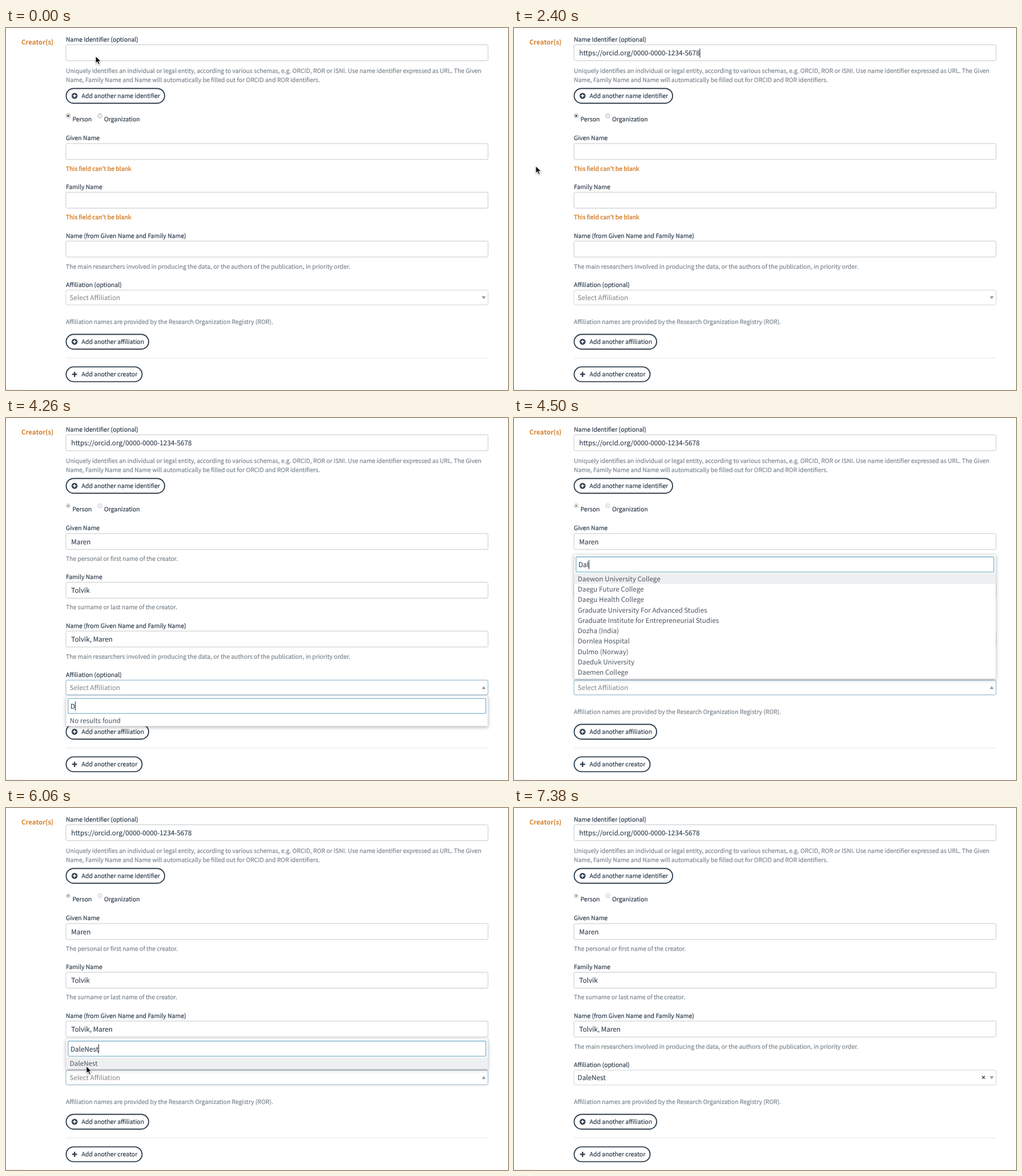
An HTML page that plays this animation: 880x636 px, repeating every 7440 ms.

```html
<!DOCTYPE html>
<html lang="en">
<head>
<meta charset="utf-8">
<title>Creator form</title>
<style>
  html, body { margin: 0; width: 100%; height: 100%; overflow: hidden; background: #fff; }
  svg { display: block; width: 880px; height: 636px; }
  text {
    font-family: "Noto Sans CJK JP", "Noto Sans CJK SC", "Noto Sans CJK KR", "Noto Sans CJK", Lato, sans-serif;
    font-size: 10.5px; fill: #2f3e4e; stroke: #2f3e4e; stroke-width: .2px;
    text-rendering: geometricPrecision;
  }
  .help { font-size: 10.4px; fill: #7b858d; stroke: #7b858d; }
  .error { font-size: 10.4px; fill: #d5812f; stroke: #d5812f; stroke-width: .4px; }
  .title { font-size: 11.45px; font-weight: 700; fill: #d5812f; stroke: none; }
  .value { font-size: 11.72px; stroke-width: .12px; }
  .item { font-size: 11.67px; fill: #4b5661; stroke: none; }
  .muted { font-size: 11.67px; fill: #808080; stroke: none; }
  .box { fill: #fff; stroke: #c6c8ca; }
  .pill { fill: #fff; stroke: #33424f; stroke-width: 1.9px; }
  .caret { stroke: #222; }
  .search { fill: #fff; stroke: #7fb3c8; stroke-width: 1.3px; }
</style>
</head>
<body>
<svg id="stage" viewBox="0 0 880 636"></svg>
<script>
const LOOP = 7440, STEP = 60;
const ORG = 'DaleNest';
const GIVEN = 'Maren', FAMILY = 'Tolvik';
const URL_TEXT = 'https://orcid.org/0000-0000-1234-5678';
const MATCHES = [
  'Daewon University College', 'Daegu Future College', 'Daegu Health College',
  'Graduate University For Advanced Studies',
  'Graduate Institute for Entrepreneurial Studies',
  'Dozha (India)', 'Dornlea Hospital', 'Dulmo (Norway)',
  'Daeduk University', 'Daemen College'
];

// Event times in ms
const T = { focus: 480, paste: 1200, blur: 2580, fill: 2880, open: 3660, list: 4440, narrow: 5040, pick: 6300 };
const KEYS = [4200, 4380, 4500, 4680, 4980, 5220, 5400, 5520];
// Pointer path: time, x, y
const PATH = [
  [0, 157, 49], [360, 152, 43], [1500, 152, 43], [2220, 38, 242], [2760, 38, 242],
  [3480, 148, 470], [5760, 148, 470], [6180, 139, 449], [6660, 139, 449], [7140, 96, 650], [LOOP, 96, 650]
];

const stage = document.getElementById('stage');

function add(parent, tag, attrs = {}, content = '') {
  const el = document.createElementNS('http://www.w3.org/2000/svg', tag);
  for (const k in attrs) el.setAttribute(k, attrs[k]);
  el.textContent = content;
  return parent.appendChild(el);
}
const group = (parent = stage) => add(parent, 'g');
const text = (parent, x, y, cls, content) => add(parent, 'text', { x, y, class: cls }, content);
const rect = (parent, x, y, width, height, attrs) => add(parent, 'rect', { x, y, width, height, ...attrs });
const show = (el, on) => el.setAttribute('visibility', on ? 'visible' : 'hidden');

function field(y) {
  rect(stage, 105, y, 740, 28, { rx: 2.5, class: 'box' });
  return text(stage, 114.3, y + 18.5, 'value', '');
}

function pill(y, width, label, round) {
  rect(stage, 105.5, y, width, 26, { rx: 13, class: 'pill' });
  const cy = y + 13;
  if (round) add(stage, 'circle', { cx: 120.2, cy, r: 5.2, fill: '#2f3e4e' });
  add(stage, 'path', {
    d: round ? `M117.2 ${cy}h6m-3-3v6` : `M115.7 ${cy}h9m-4.5-4.5v9`,
    stroke: round ? '#fff' : '#2f3e4e', 'stroke-width': round ? 1.7 : 2.4
  });
  text(stage, 132.5, y + 17, '', label);
}

function radio(cx) {
  return add(stage, 'circle', { cx, cy: 154.2, r: 3.8, fill: '#efefef', stroke: '#a2a2a2', 'stroke-width': .8 });
}

// Form
text(stage, 27, 29, 'title', 'Creator(s)');
text(stage, 105, 24, '', 'Name Identifier (optional)');
const idText = field(29.5);
const idCaret = add(stage, 'line', { y1: 36, y2: 52, class: 'caret' });
text(stage, 105, 78.7, 'help', 'Uniquely identifies an individual or legal entity, according to various schemas, e.g. ORCID, ROR or ISNI. Use name identifier expressed as URL. The Given');
text(stage, 105, 95, 'help', 'Name, Family Name and Name will automatically be filled out for ORCID and ROR identifiers.');
pill(106.2, 172.5, 'Add another name identifier', true);
const radios = [radio(109), radio(164.5)];
const dot = add(stage, 'circle', { cx: 109, cy: 154.2, r: 1.7 });
text(stage, 116.5, 164.3, '', 'Person');
text(stage, 172, 164.3, '', 'Organization');
text(stage, 105, 197, '', 'Given Name');
const givenText = field(203);
text(stage, 105, 283, '', 'Family Name');
const familyText = field(288.5);
text(stage, 105, 368.5, '', 'Name (from Given Name and Family Name)');
const nameText = field(374.3);
const errors = group(), hints = group();
for (const [y, hint] of [[250.7, 'The personal or first name of the creator.'], [336.4, 'The surname or last name of the creator.']]) {
  text(errors, 105, y, 'error', "This field can't be blank");
  text(hints, 105, y, 'help', hint);
}
text(stage, 105, 423, 'help', 'The main researchers involved in producing the data, or the authors of the publication, in priority order.');
text(stage, 105, 454.8, '', 'Affiliation (optional)');
const select = rect(stage, 105, 460.5, 740, 26, { rx: 2.5, fill: '#fff' });
const selectText = text(stage, 111.6, 477.5, 'muted', '');
const arrow = add(stage, 'path', { fill: '#999' });
const clear = add(stage, 'path', { d: 'M820.5 470.8l5 5m0-5l-5 5', stroke: '#444', 'stroke-width': 1.4 });
text(stage, 105, 519.5, 'help', 'Affiliation names are provided by the Research Organization Registry (ROR).');
pill(538.2, 144.5, 'Add another affiliation', true);
add(stage, 'path', { d: 'M105 579.8H845', stroke: '#d2d5d7', 'stroke-dasharray': '1.5 1' });
pill(595.4, 133, 'Add another creator', false);
rect(stage, 0, 635, 32, 1, { fill: '#f1f1f1' });

// Dropdown panels: the search box and its rows hang from the panel's top edge
function panel(y, height, rows, active) {
  const g = group();
  g.setAttribute('transform', `translate(0 ${y})`);
  rect(g, 105.3, 0, 739.4, height, {
    fill: '#fff', stroke: '#dcdfe1', 'stroke-width': .7, style: 'filter:drop-shadow(0 2px 3px rgba(0,0,0,.28))'
  });
  if (active) rect(g, 105.6, 33, 738.8, 18.4, { fill: '#eeeff0' });
  rect(g, 108.7, 4, 732.6, 26.6, { rx: 1.5, class: 'search' });
  rows.forEach((row, i) => text(g, 111.8, 47 + i * 18.22, 'item', row));
  const typed = text(g, 113, 22, 'value', '');
  const caret = add(g, 'line', { y1: 9.5, y2: 25.5, class: 'caret' });
  return { g, typed, caret };
}
const panels = [
  panel(488.6, 52.6, ['No results found'], false),
  panel(240, 218, MATCHES, true),
  panel(405.5, 52.5, [ORG], true)
];

const pointer = add(stage, 'path', {
  d: 'M0 0V13.4L3.1 10.6 5.2 15.4 7.7 14.3 5.6 9.7H9.8Z',
  fill: '#111', stroke: '#fff', 'stroke-width': 1.1, 'stroke-linejoin': 'round',
  style: 'filter:drop-shadow(0 1px 1px rgba(0,0,0,.3))'
});

function put(el, value) {
  if (el.textContent !== value) el.textContent = value;
}

function placeCaret(caret, el) {
  const x = +el.getAttribute('x') + (el.textContent ? el.getComputedTextLength() : 0) + .4;
  caret.setAttribute('x1', x);
  caret.setAttribute('x2', x);
}

function pointerAt(t) {
  const i = PATH.findIndex(p => p[0] > t);
  const [t0, x0, y0] = PATH[i - 1], [t1, x1, y1] = PATH[i];
  const u = (t - t0) / (t1 - t0), e = u * u * (3 - 2 * u);
  return [x0 + (x1 - x0) * e, y0 + (y1 - y0) * e];
}

function draw(t) {
  const filled = t >= T.fill, picked = t >= T.pick, open = t >= T.open && !picked;

  put(idText, t >= T.paste ? URL_TEXT : '');
  placeCaret(idCaret, idText);
  show(idCaret, t >= T.focus && t < T.blur);

  put(givenText, filled ? GIVEN : '');
  put(familyText, filled ? FAMILY : '');
  put(nameText, filled ? `${FAMILY}, ${GIVEN}` : '');
  show(errors, !filled);
  show(hints, filled);
  radios.forEach(r => r.setAttribute('stroke', filled ? '#c9c9c9' : '#a2a2a2'));
  dot.setAttribute('fill', filled ? '#8f8f8f' : '#383838');

  select.setAttribute('stroke', open ? '#86aec8' : '#d3d5d7');
  put(selectText, picked ? ORG : 'Select Affiliation');
  selectText.setAttribute('class', picked ? 'value' : 'muted');
  arrow.setAttribute('d', open ? 'M834.3 476.2h6.4l-3.2-5.4z' : 'M834 471.2h7l-3.5 5.2z');
  show(clear, picked);

  const count = KEYS.filter(k => k <= t).length;
  const current = t < T.list ? 0 : t < T.narrow ? 1 : 2;
  panels.forEach((p, i) => {
    const on = open && i === current;
    show(p.g, on);
    if (!on) return;
    put(p.typed, ORG.slice(0, count));
    placeCaret(p.caret, p.typed);
  });

  // The pointer hides while typing
  show(pointer, t < KEYS[0] || t >= 5760);
  pointer.setAttribute('transform', `translate(${pointerAt(t)})`);
}

const start = performance.now();
function tick() {
  const t = (performance.now() - start) % LOOP;
  draw(Math.floor(t / STEP) * STEP);
  requestAnimationFrame(tick);
}
draw(0);
requestAnimationFrame(tick);
</script>
</body>
</html>
```
